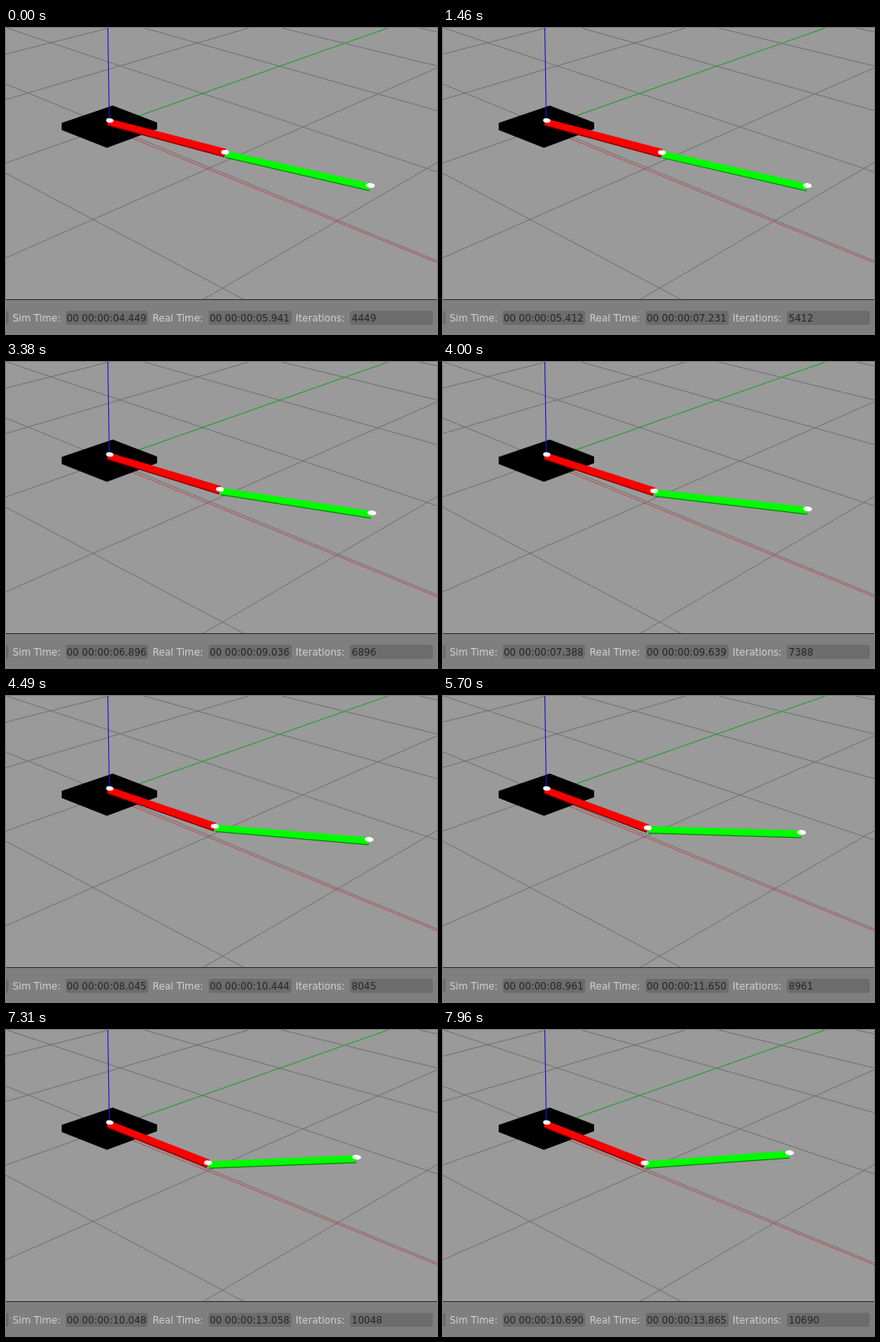
Animation of 519 by 369 pixels, one loop 8 s. Source, as an HTML page with a canvas:

```html
<!DOCTYPE html>
<html lang="en">
<head>
<meta charset="utf-8">
<title>Two-link arm simulation</title>
<style>
  html, body { margin: 0; width: 100%; height: 100%; overflow: hidden; background: #9a9a9a; }
  canvas { display: block; }
</style>
</head>
<body>
<canvas id="stage" width="519" height="369"></canvas>
<script>
const ctx = document.getElementById('stage').getContext('2d');
const W = 519, H = 369, LOOP = 8000, FLOOR_H = 327;

// Bursts of redraws: first time, last time, number of updates
const bursts = [
  [500, 1460, 13], [1690, 2580, 8], [2820, 3380, 6], [3440, 3840, 4],
  [4000, 4490, 5], [4730, 4970, 2], [5210, 5700, 5], [5940, 6180, 2],
  [6260, 6600, 4], [6670, 7080, 3], [7310, 7960, 5]
];
const updates = [0];
for (const [from, to, n] of bursts)
  for (let i = 0; i < n; i++) updates.push(from + (to - from) * i / (n - 1));

// Arm poses and clocks; ticks = clock refreshes until the next key
const keys = [
  { t: 300,  pose: [264, 149.8, 438.5, 189.8], sim: 4.449,  real: 5.941,  ticks: 6 },
  { t: 1460, pose: [263.7, 150.2, 438.5, 190], sim: 5.412,  real: 7.231,  ticks: 9 },
  { t: 3380, pose: [257.6, 153.5, 440.3, 182], sim: 6.896,  real: 9.036,  ticks: 7 },
  { t: 4490, pose: [251.5, 157, 437, 173],     sim: 8.045,  real: 10.444, ticks: 6 },
  { t: 5700, pose: [246.5, 159, 431.5, 164.5], sim: 8.961,  real: 11.650, ticks: 4 },
  { t: 6600, pose: [244, 160, 427, 159],       sim: 9.567,  real: 12.453, ticks: 7 },
  { t: 7960, pose: [243, 160.3, 417, 148],     sim: 10.690, real: 13.865, ticks: 1 }
];

const lerp = (a, b, p) => a + (b - a) * p;

function secant(k, c) {
  const a = keys[k], b = keys[k + 1];
  return (b.pose[c] - a.pose[c]) / (b.t - a.t);
}

function tangent(k, c) {
  if (k === 0) return secant(0, c);
  if (k === keys.length - 1) return secant(k - 1, c);
  const a = secant(k - 1, c), b = secant(k, c);
  return a * b <= 0 ? 0 : 2 * a * b / (a + b);
}

function stateAt(time) {
  const t = Math.max(keys[0].t, updates.filter(u => u <= time + 0.01).pop());
  let k = 0;
  while (k < keys.length - 2 && t >= keys[k + 1].t) k++;
  const a = keys[k], b = keys[k + 1], span = b.t - a.t;
  const p = Math.min(1, (t - a.t) / span), q = 1 - p;
  const pose = a.pose.map((v, c) =>
    v * (1 + 2 * p) * q * q + b.pose[c] * p * p * (3 - 2 * p) +
    span * (tangent(k, c) * p * q * q - tangent(k + 1, c) * p * p * q));
  const tick = Math.floor(p * a.ticks + 1e-6) / a.ticks;
  return { pose, sim: lerp(a.sim, b.sim, tick), real: lerp(a.real, b.real, tick) };
}

function line(x1, y1, x2, y2, color, width = 1, dash = []) {
  ctx.strokeStyle = color;
  ctx.lineWidth = width;
  ctx.setLineDash(dash);
  ctx.beginPath();
  ctx.moveTo(x1, y1);
  ctx.lineTo(x2, y2);
  ctx.stroke();
  ctx.setLineDash([]);
}

function polygon(points, color) {
  ctx.fillStyle = color;
  ctx.beginPath();
  points.forEach(([x, y]) => ctx.lineTo(x, y));
  ctx.fill();
}

// Grid lines fan out from two vanishing points on the horizon
function grid() {
  const horizon = -300;
  const fan = (vx, first, step, count) => {
    for (let i = 0; i < count; i++) {
      const x = first + i * step;
      line(x, 0, x + (x - vx) * 400 / -horizon, 400, '#6a6a6a', 0.85);
    }
  };
  fan(-895, -330, 165.5, 6);
  fan(1308, 124, 168, 5);
}

function axes() {
  line(124, 118.4, 461, -0.3, '#22b022', 0.95);
  line(140, 128, W, 282.9, '#e01818', 1, [1.5, 0.9]);
}

function base() {
  polygon([[67, 114.5], [128.5, 93.5], [182, 114], [182, 122], [121.5, 144.6], [67, 123]], '#000');
  line(124.4, 110, 122.6, 0, '#1818d0', 1.1);
}

function link(x1, y1, x2, y2, w1, w2, drop, color, shade) {
  const len = Math.hypot(x2 - x1, y2 - y1);
  const nx = -(y2 - y1) / len, ny = (x2 - x1) / len;
  const band = (dy, fill) => polygon([
    [x1 - nx * w1 / 2, y1 - ny * w1 / 2 + dy],
    [x2 - nx * w2 / 2, y2 - ny * w2 / 2 + dy],
    [x2 + nx * w2 / 2, y2 + ny * w2 / 2 + dy],
    [x1 + nx * w1 / 2, y1 + ny * w1 / 2 + dy]
  ], fill);
  band(drop, shade);
  band(0, color);
}

function joint(x, y, rx, ry) {
  ctx.fillStyle = '#fff';
  ctx.beginPath();
  ctx.ellipse(x, y, rx, ry, 0.08, 0, Math.PI * 2);
  ctx.fill();
}

function arm([ex, ey, tx, ty]) {
  link(ex + 1, ey + 1.9, tx, ty + 1.7, 7.8, 8.2, 1.2, '#00fb00', '#078507');
  link(123, 112.9, ex, ey + 0.3, 7.6, 9.2, 1.5, '#fb0000', '#850000');
  joint(125, 111.5, 4.4, 2.6);
  joint(ex, ey, 4.8, 2.8);
  joint(tx + 0.3, ty, 5.3, 2.9);
}

function field(x, w, text, right) {
  ctx.fillStyle = '#6c6c6c';
  ctx.beginPath();
  ctx.roundRect(x, 341, w, 17, 3);
  ctx.fill();
  ctx.save();
  ctx.clip();
  ctx.fillStyle = '#262626';
  ctx.textAlign = right ? 'right' : 'left';
  ctx.fillText(text, right || x + 2.3, 353.7);
  ctx.restore();
}

function label(text, x) {
  ctx.fillStyle = '#d2d2d2';
  ctx.textAlign = 'left';
  ctx.fillText(text, x, 353.7);
}

const clock = s => '00 00:00:' + s.toFixed(3).padStart(6, '0');

function statusBar(sim, real) {
  ctx.fillStyle = '#7f7f7f';
  ctx.fillRect(0, FLOOR_H, W, H - FLOOR_H);
  ctx.fillStyle = '#2c2c2c';
  ctx.fillRect(0, FLOOR_H, W, 1);
  ctx.font = '11.6px "DejaVu Sans", sans-serif';
  field(-20, 23, '');
  label('Sim Time:', 8);
  field(72, 99, clock(sim), 169.2);
  label('Real Time:', 176.5);
  field(244, 100, clock(real), 341.5);
  label('Iterations:', 348.8);
  field(414, 100, String(Math.round(sim * 1000)));
}

function draw(time) {
  const { pose, sim, real } = stateAt(time);
  ctx.fillStyle = '#9a9a9a';
  ctx.fillRect(0, 0, W, H);
  grid();
  axes();
  base();
  arm(pose);
  statusBar(sim, real);
}

const start = performance.now();
function loop() {
  draw((performance.now() - start) % LOOP);
  requestAnimationFrame(loop);
}
loop();
</script>
</body>
</html>
```
